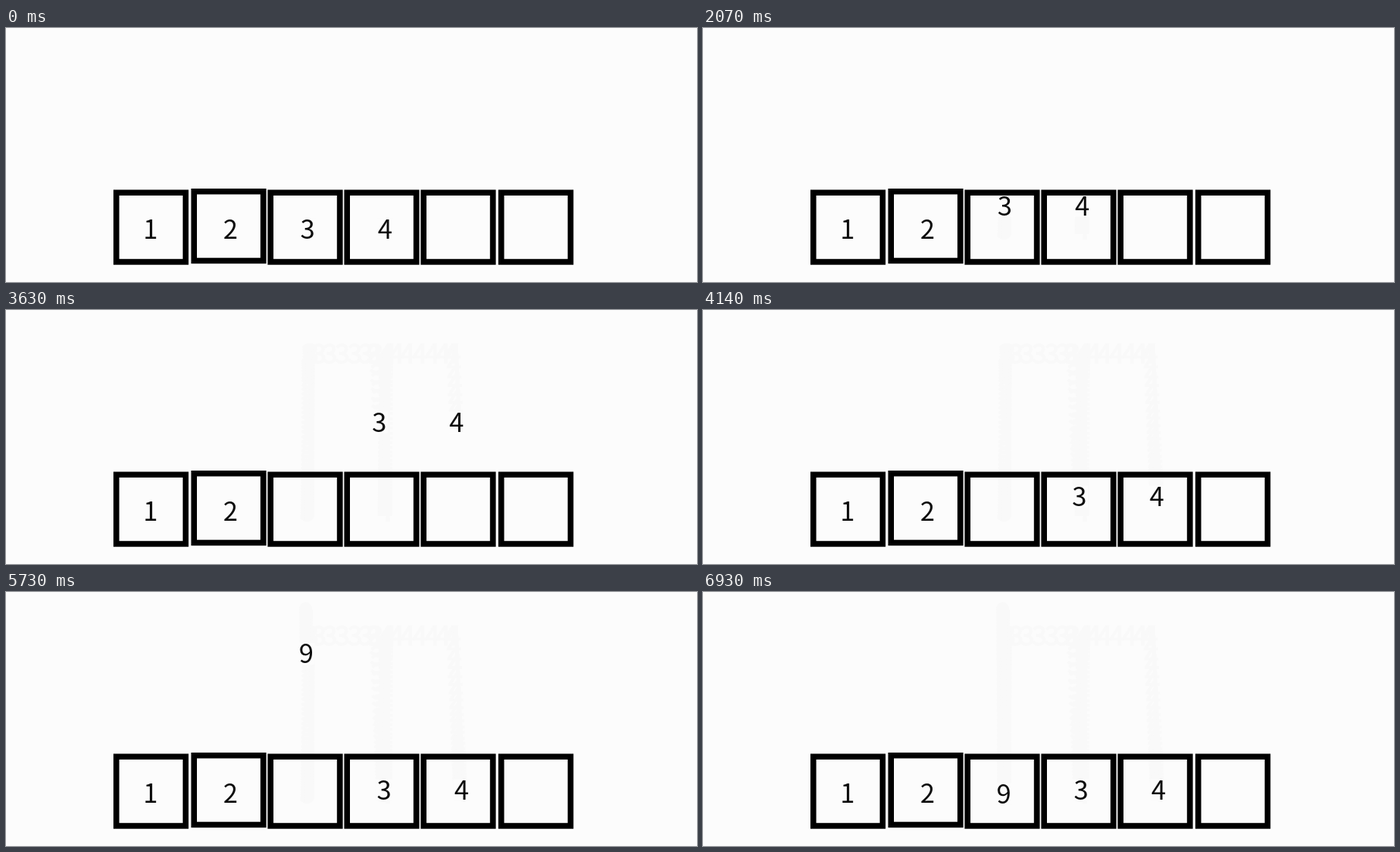
Write an HTML page with a canvas that moves like this. It is 894x329 px and loops after 8310 ms.

```html
<!DOCTYPE html>
<html lang="en">
<head>
<meta charset="utf-8">
<title>Array insert</title>
<style>
  html, body { margin: 0; width: 100%; height: 100%; overflow: hidden; background: #fcfcfc; }
  canvas { display: block; }
</style>
</head>
<body>
<canvas id="stage" width="894" height="329"></canvas>
<script>
const ctx = document.getElementById('stage').getContext('2d');
const LOOP = 8310, STEP = 30;
const BG = '#fcfcfc', INK = '#0c0c0c', TRAIL = '#f9f9f9';
const SIZE = 97.2, LINE = 7.5;
const cellLeft = [139, 239.5, 338.5, 437.5, 536.5, 637];

const smooth = k => k * k * (3 - 2 * k);
const slowStart = k => smooth(k ** 1.59);
const slowEnd = k => 1 - (1 - k) ** 2.8;

// Each leg moves on from where the one before it ended.
const pair = {
  start: [390.3, 260.5],
  legs: [
    { from: 1320, to: 3150, end: [391.5, 57], ease: slowStart },
    { from: 3150, to: 3390, end: [479, 57], ease: smooth },
    { from: 3390, to: 4680, end: [487.8, 259], ease: slowEnd },
    { from: 4680, to: 4860, end: [489.2, 256.5], ease: smooth }
  ]
};
const insert = {
  start: [388.3, 27],
  legs: [{ from: 5250, to: 6810, end: [389.2, 261.5], ease: smooth }]
};
const movers = [
  { digit: '3', path: pair, dx: 0, born: 0 },
  { digit: '4', path: pair, dx: 100.2, born: 0 },
  { digit: '9', path: insert, dx: 0, born: 4950 }
];

function place({ path, dx }, t) {
  let [x, y] = path.start;
  for (const { from, to, end, ease } of path.legs) {
    if (t <= from) break;
    const k = ease(Math.min(1, (t - from) / (to - from)));
    x += (end[0] - x) * k;
    y += (end[1] - y) * k;
  }
  return [x + dx, y];
}

function write(digit, x, y, outline) {
  ctx.fillText(digit, x, y + 12.3);
  if (outline) ctx.strokeText(digit, x, y + 12.3);
}

function drawTrail(mover, t) {
  const { legs } = mover.path;
  const end = Math.min(t, legs[legs.length - 1].to);
  for (let past = legs[0].from; past < end; past += STEP) {
    write(mover.digit, ...place(mover, past), true);
  }
}

function draw(t) {
  ctx.fillStyle = BG;
  ctx.fillRect(0, 0, 894, 329);
  ctx.font = '300 34px "Noto Sans CJK SC", "Noto Sans CJK JP", sans-serif';
  ctx.textAlign = 'center';

  ctx.fillStyle = ctx.strokeStyle = TRAIL;
  ctx.lineWidth = 1.5;
  for (const mover of movers) drawTrail(mover, t);

  // the live digit wipes the trail beneath it
  const shown = movers.filter(m => t >= m.born);
  ctx.fillStyle = BG;
  for (const mover of shown) {
    const [x, y] = place(mover, t);
    ctx.fillRect(x - 11, y - 14, 22, 28);
  }

  ctx.strokeStyle = '#000';
  ctx.lineWidth = LINE;
  cellLeft.forEach((x, i) => {
    const y = i === 1 ? 208 : 209.5;
    ctx.strokeRect(x + LINE / 2, y + LINE / 2, SIZE - LINE, SIZE - LINE);
  });

  ctx.fillStyle = INK;
  write('1', 187, 260.5);
  write('2', 290.5, 260.5);
  for (const mover of shown) write(mover.digit, ...place(mover, t));
}

const begin = performance.now();
function tick() {
  const t = (performance.now() - begin) % LOOP;
  draw(Math.floor(t / STEP) * STEP);
  requestAnimationFrame(tick);
}
tick();
</script>
</body>
</html>
```
